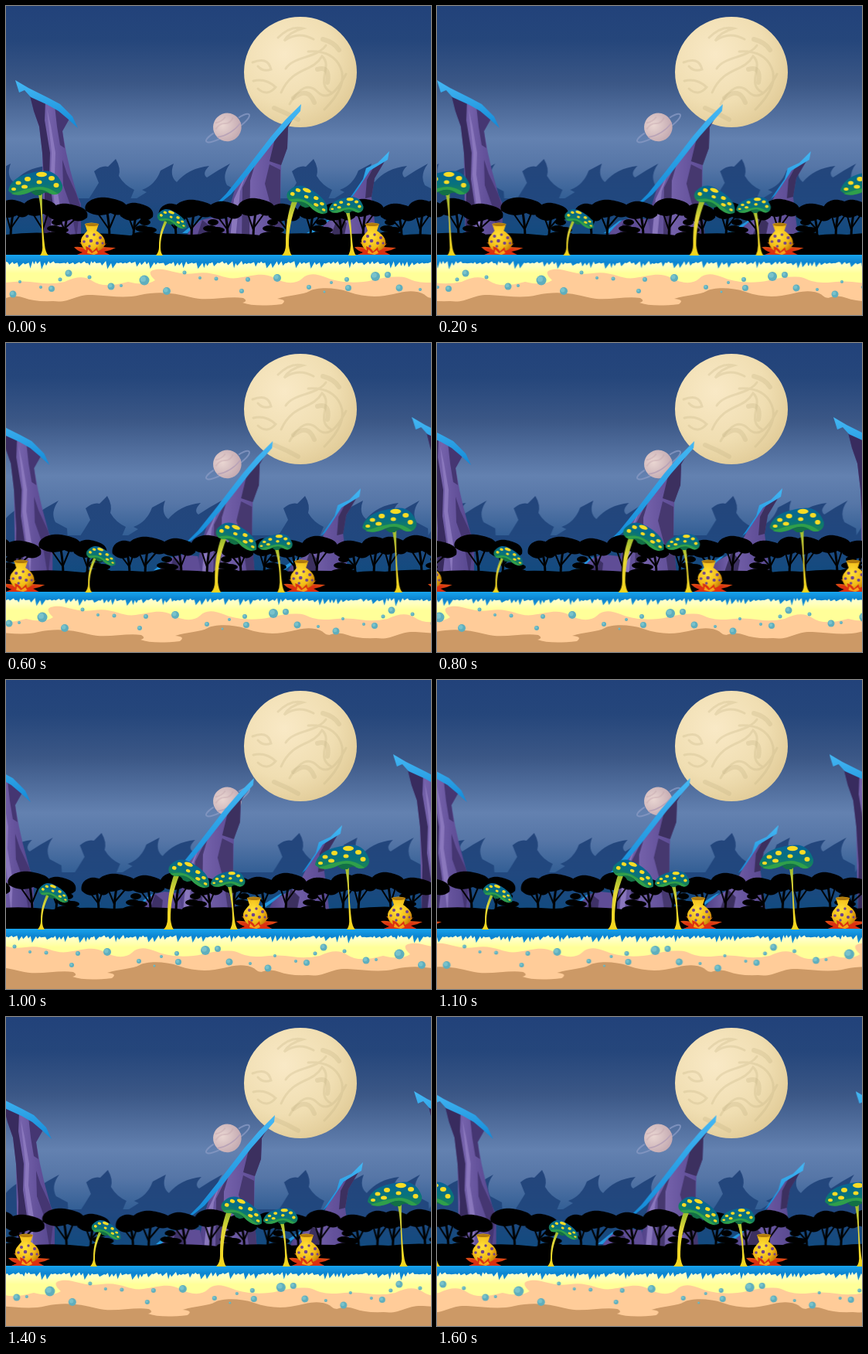
An HTML page that plays this animation: 550x400 px, repeating every 1700 ms.

```html
<!DOCTYPE html>
<html lang="en">
<head>
<meta charset="utf-8">
<title>Alien landscape</title>
<style>
html, body { margin: 0; width: 100%; height: 100%; overflow: hidden; background: #24427a; }
svg { display: block; width: 550px; height: 400px; }
/* Every layer pans left in ten steps, then part of the way back. */
.layer { animation: pan 1700ms infinite; }
@keyframes pan {
  0% { transform: translateX(0); animation-timing-function: steps(10, end); }
  58.8235% { transform: translateX(var(--far)); animation-timing-function: steps(7, end); }
  100% { transform: translateX(calc(var(--far) * .2222)); }
}
</style>
</head>
<body>
<svg viewBox="0 0 550 400" xmlns="http://www.w3.org/2000/svg">
<defs>
  <linearGradient id="sky" x2="0" y2="1">
    <stop offset="0" stop-color="#22427a"/><stop offset=".11" stop-color="#25467b"/>
    <stop offset=".25" stop-color="#3b5786"/><stop offset=".43" stop-color="#6381b0"/>
    <stop offset=".52" stop-color="#5676a7"/><stop offset=".64" stop-color="#2d5b92"/>
    <stop offset=".8" stop-color="#104a80"/>
  </linearGradient>
  <linearGradient id="ridge" gradientUnits="userSpaceOnUse" x1="0" y1="195" x2="0" y2="310">
    <stop offset="0" stop-color="#24457b"/><stop offset=".5" stop-color="#21487f"/><stop offset="1" stop-color="#0e4c80"/>
  </linearGradient>
  <radialGradient id="moon" cx=".36" cy=".34" r=".74">
    <stop offset="0" stop-color="#f9e9c6"/><stop offset=".6" stop-color="#f0deb2"/><stop offset="1" stop-color="#e0ca96"/>
  </radialGradient>
  <radialGradient id="pink" cx=".4" cy=".35" r=".7">
    <stop offset="0" stop-color="#ead6d2"/><stop offset="1" stop-color="#c2a8b0"/>
  </radialGradient>
  <linearGradient id="rock">
    <stop offset="0" stop-color="#4b3c82"/><stop offset=".35" stop-color="#7562ab"/>
    <stop offset=".65" stop-color="#64529b"/><stop offset="1" stop-color="#54458c"/>
  </linearGradient>
  <linearGradient id="ice" x2="0" y2="1">
    <stop offset="0" stop-color="#45b8f4"/><stop offset="1" stop-color="#128ad8"/>
  </linearGradient>
  <linearGradient id="cap" x2="0" y2="1">
    <stop offset="0" stop-color="#07629a"/><stop offset=".55" stop-color="#08727c"/><stop offset="1" stop-color="#1d8a4c"/>
  </linearGradient>
  <linearGradient id="stem" x2="0" y2="1">
    <stop offset="0" stop-color="#8fb82c"/><stop offset=".35" stop-color="#e3d839"/><stop offset="1" stop-color="#f6d51c"/>
  </linearGradient>
  <radialGradient id="clay" cx=".4" cy=".45" r=".62">
    <stop offset="0" stop-color="#ffe23c"/><stop offset=".65" stop-color="#f3bd18"/><stop offset="1" stop-color="#c98408"/>
  </radialGradient>
  <linearGradient id="fire" x2="0" y2="1">
    <stop offset="0" stop-color="#f2701a"/><stop offset="1" stop-color="#c8180c"/>
  </linearGradient>
  <linearGradient id="water" gradientUnits="userSpaceOnUse" x1="0" y1="322" x2="0" y2="340">
    <stop offset="0" stop-color="#18a4ee"/><stop offset=".55" stop-color="#0c84d0"/><stop offset="1" stop-color="#1693d8"/>
  </linearGradient>
  <linearGradient id="sand" gradientUnits="userSpaceOnUse" x1="0" y1="328" x2="0" y2="346">
    <stop offset="0" stop-color="#ffffe0"/><stop offset=".5" stop-color="#ffffc0"/><stop offset="1" stop-color="#ffff99"/>
  </linearGradient>

  <g id="hump"><path d="M103 256L112 242L120 229L114 214Q124 206 132 208L142 198Q149 210 146 220Q153 232 166 238L161 250L168 256Z"/></g>
  <g id="spikes"><path d="M158 256L182 241L176 238Q193 232 200 213L217 204Q211 220 221 228Q236 210 263 207Q253 217 260 222Q275 212 290 204Q279 219 286 232L301 240L302 256Z"/></g>

  <g id="shroom">
    <path fill="url(#cap)" d="M-38-3C-35-18-20-25 3-28C20-31 28-22 32-10C33-2 27 3 19 2C8-2 0-6-8-2C-18 4-33 4-38-3Z"/>
    <path fill="#2f9f4b" d="M-34 1C-22-2-12-7 3-8C14-8 23-1 26 1C22 3 18 2 14 0C8-4 0-5-8-2C-18 3-28 4-34 1Z"/>
    <path fill="#127046" d="M-9-1Q3-8 15 0Q8-2 4 3L-3 3Z"/>
    <g fill="#f8dc25">
      <ellipse cx="5" cy="-24" rx="7" ry="3.200"/><ellipse cx="-13" cy="-18" rx="4" ry="3"/>
      <ellipse cx="18" cy="-19" rx="4" ry="3"/><ellipse cx="2" cy="-14" rx="3.500" ry="2.500"/>
      <ellipse cx="-25" cy="-13" rx="3.500" ry="2.500"/><ellipse cx="-31" cy="-5" rx="3" ry="2"/>
      <ellipse cx="-17" cy="-8" rx="4" ry="2.500"/><ellipse cx="24" cy="-10" rx="3.500" ry="3"/>
    </g>
  </g>

  <g id="pot">
    <path fill="url(#fire)" d="M-25 312Q-14 311-8 315L-18 306Q-4 308 2 315L17 307L13 312L29 313Q22 317 14 318L21 322H-21L-14 319Q-21 317-25 312Z"/>
    <path fill="url(#clay)" d="M-11 282Q-3 279 7 282L4 291C10 295 17 301 15 309Q10 319-1 319C-10 319-17 311-16 303C-15 298-11 295-8 291Z"/>
    <ellipse cx="-2" cy="283" rx="8.500" ry="2" fill="#b07a0d"/>
    <g fill="#70428c">
      <circle cx="-8" cy="298" r="2"/><circle cx="1" cy="296" r="1.700"/><circle cx="9" cy="300" r="2"/>
      <circle cx="-12" cy="305" r="1.800"/><circle cx="-3" cy="304" r="2.300"/><circle cx="5" cy="307" r="2"/>
      <circle cx="-5" cy="311" r="1.700"/><circle cx="12" cy="307" r="1.500"/>
    </g>
    <path fill="#dc3010" d="M-20 314Q-13 314-9 317L-10 311Q-3 313-1 318L5 312L6 317L18 313L13 318L21 322H-21L-13 319Z"/>
    <path fill="#f9a21b" d="M-8 320L-7 315L-2 320L4 316L6 320L1 322Z"/>
  </g>
</defs>

<rect width="550" height="400" fill="url(#sky)"/>

<ellipse cx="381" cy="85.500" rx="73" ry="71.500" fill="url(#moon)"/>
<g fill="none" stroke="#c2b285" stroke-opacity=".3" stroke-width="3" stroke-linecap="round">
  <path d="M352 41Q368 25 384 29Q366 34 360 45Q378 32 398 43M319 73Q339 65 343 82Q333 86 326 78M320 97Q336 93 349 105Q338 118 326 107"/>
  <path d="M362 81C372 65 402 68 414 51M356 112C371 78 396 87 409 65C424 78 399 100 421 112M367 127Q386 94 403 111T440 88M391 59Q423 57 433 80T412 134"/>
  <path stroke-width="6" d="M372 119Q391 104 399 125M403 82Q420 77 416 99M347 132Q364 139 378 147M410 43Q425 47 431 57"/>
</g>

<g transform="rotate(-32 287 158)">
  <path d="M268 154C246 154 249 165 287 165S328 154 306 154" fill="none" stroke="#8799c4" stroke-width="2" opacity=".8"/>
  <circle cx="287" cy="156.700" r="18.300" fill="url(#pink)"/>
  <path d="M269 161Q286 168 305 161" fill="none" stroke="#b9a3b7" stroke-width="1.500"/>
  <path d="M273 151q8-4 14 0t13-1M277 144q8 3 15 0" fill="none" stroke="#c4a4ac" stroke-width="2" opacity=".4"/>
</g>

<g class="layer" style="--far:-18.400px" fill="url(#ridge)">
  <rect y="249" width="600" height="75"/>
  <use href="#spikes" x="-211"/><use href="#hump"/><use href="#spikes"/>
  <use href="#hump" x="256"/><use href="#spikes" x="256"/><use href="#hump" x="450"/>
</g>

<g class="layer" style="--far:-61.200px">
  <g id="cliffs">
    <path fill="url(#rock)" d="M31 116L60 124L82 146L73 162L78 190L83 212L92 245L97 256V302H49L48 256L47 190L43 156L36 136Z"/>
    <path fill="#382b5e" d="M31 116L51 123L50 148L57 190L56 224L61 258L56 302H49L50 240L47 190L43 156L36 136Z"/>
    <path fill="#453672" d="M63 129L82 146L73 162L76 184L70 180L66 156ZM73 199L79 217L91 243L96 258L91 302L84 260L74 232Z"/>
    <path fill="#8a77bd" d="M53 133L58 155L64 190L63 218L70 260L68 302L63 258L58 218L59 190Z"/>
    <path fill="url(#ice)" d="M12 96L29 106L55 119L70 127L86 143L93 158L81 147L68 136L54 128L32 118L24 109L17 112Z"/>

    <path fill="url(#rock)" d="M379 132L365 157L364 184L356 206L355 255L359 302H281L290 258L300 225L340 178Z"/>
    <path fill="#3c305f" d="M380 131L365 157L364 184L356 206L341 201L349 168Z"/>
    <path fill="#46386f" d="M324 199L316 226L315 302H305L306 235ZM341 205L355 212L355 255L359 302H349L343 260L335 230Z"/>
    <path fill="#8a77bd" d="M312 214L303 240L297 302H290L295 250Z"/>
    <path fill="url(#ice)" d="M382 127L381 136L352 169L316 215L291 244L276 256L270 258L285 243L309 213L343 169L361 148Z"/>

    <path fill="#5f4d96" d="M234 298L240 284L253 277L266 274L285 276L290 302H234Z"/>
    <path fill="#3e3167" d="M254 277L264 285L262 302H246Z"/>
    <path fill="#2398e0" d="M228 294L248 278L252 277L241 287L235 294Z"/>

    <path fill="url(#rock)" d="M490 201L477 223L473 247L480 302H398L408 284L438 268L450 244L470 213Z"/>
    <path fill="#3c305f" d="M490 201L477 223L473 247L465 249L467 225L475 210ZM430 270L441 281L437 302H419Z"/>
    <path fill="url(#ice)" d="M496 188L494 199L471 213L456 236L449 246L444 250L462 224L466 210L481 203Z"/>
    <path fill="#2398e0" d="M389 294L416 277L420 276L408 286L397 294Z"/>
  </g>
  <use href="#cliffs" x="550"/>
</g>

<g class="layer" style="--far:-100px">
  <g id="trees" stroke="#000" stroke-linecap="round"></g>
  <use href="#trees" x="550"/>
</g>

<g class="layer" style="--far:-220px">
  <g id="soil">
    <rect y="326" width="551" height="74" fill="url(#sand)"/>
    <path fill="#fc9" d="M0 358Q22 355 40 358T76 357Q98 346 112 356T158 357Q181 363 193 355Q182 345 190 342C209 337 219 350 245 346S281 355 300 352S333 344 347 352S376 360 383 353S399 345 416 352S458 359 474 355S510 348 521 353S540 358 551 358V400H0Z"/>
    <path fill="#c96" d="M0 378Q12 373 24 378T61 382C83 385 89 373 112 374S153 379 174 374S218 371 239 377S286 375 307 378Q314 382 306 384Q322 390 357 386Q365 380 351 379C367 374 384 374 393 369S426 364 443 370S476 377 490 375S518 367 532 370S541 377 551 378V400H0Z"/>
    <g id="bubbles"></g>
  </g>
  <use href="#soil" x="550"/>
</g>

<g class="layer" style="--far:-153px">
  <g id="front">
    <path id="drips" fill="url(#water)"/>
    <g fill="url(#stem)">
      <path d="M41 239H47C46 266 48 291 50 309Q51 319 55 323H44Q48 318 47 309C46 280 46 262 41 239Z"/>
      <path d="M371 250L378 251C368 275 366 293 366 310Q367 319 370 323H357Q362 318 362 309C362 285 364 270 371 250Z"/>
      <path d="M438 262H444C447 281 447 296 449 311Q450 319 453 323H443Q446 317 446 310C446 293 444 278 438 262Z"/>
      <path d="M206 276L210 277C202 291 200 302 200 313Q200 319 203 323H194Q198 318 198 312C198 296 201 288 206 276Z"/>
    </g>
    <use href="#shroom" transform="translate(41 242)"/>
    <use href="#shroom" transform="translate(386 258) rotate(22) scale(-.82 .8)"/>
    <use href="#shroom" transform="translate(442 266) scale(.64 .66)"/>
    <use href="#shroom" transform="translate(212 281) rotate(20) scale(-.58 .57)"/>
    <use href="#pot" x="113"/><use href="#pot" x="476"/>
  </g>
  <use href="#front" x="550"/>
</g>
</svg>
<script>
const $ = id => document.getElementById(id);
let seed = 7;
const rand = () => (seed = seed * 16807 % 2147483647) / 2147483647;

// Umbrella trees: x, y, half width
const trees = [
  [10, 262, 20], [44, 260, 22], [80, 267, 25], [130, 259, 27], [169, 266, 21], [216, 267, 18], [244, 262, 26],
  [283, 264, 22], [324, 260, 24], [360, 267, 20], [398, 264, 20], [430, 266, 22], [466, 261, 23], [508, 267, 23], [540, 262, 20]
];
const crown = ([x, y, r]) =>
  `<path stroke="none" d="M${x - r} ${y + 6}C${x - r * 1.15} ${y - 6} ${x - r * .5} ${y - 13} ${x} ${y - 11}` +
  `S${x + r * 1.15} ${y - 5} ${x + r} ${y + 7}Q${x + r * .6} ${y + 15} ${x + r * .2} ${y + 9}` +
  `Q${x - r * .4} ${y + 16} ${x - r} ${y + 6}"/>`;
const trunk = ([x, y, r], i) => {
  const foot = x + (i % 2 ? 4 : -4);
  return `<path fill="none" stroke-width="3" d="M${x} ${y + 3}Q${foot} 282 ${foot} 302"/>` +
    `<path fill="none" stroke-width="2" d="M${x - r * .5} ${y + 6}L${foot} 290M${x + r * .5} ${y + 6}L${foot} 288"/>`;
};
// Layered shrubs that stand between the trees
const shrub = x => [[0, 280, 7, 4], [-4, 288, 9, 4], [5, 290, 10, 4], [0, 297, 17, 5]]
  .map(([dx, y, rx, ry]) => `<ellipse stroke="none" cx="${x + dx}" cy="${y}" rx="${rx}" ry="${ry}"/>`).join("");
$("trees").innerHTML = trees.map(crown).join("") + trees.map(trunk).join("") +
  [66, 180, 268, 345, 408, 497].map(shrub).join("") +
  '<path stroke="none" d="M0 296Q40 291 80 296Q120 292 160 297Q200 293 240 296Q290 292 330 297Q380 292 420 296Q470 293 510 297Q530 294 551 296V324H0Z"/>';

// Bubbles: x, y, radius
$("bubbles").innerHTML = [
  [9, 373, 4.5], [18, 357, 2], [45, 364, 2], [59, 366, 4], [70, 354, 2.5], [81, 346, 4.5], [108, 351, 2.5],
  [136, 363, 4.5], [149, 362, 2], [179, 355, 6.5], [208, 369, 5], [231, 345, 2.5], [251, 352, 2], [272, 353, 2.5],
  [305, 369, 3], [313, 354, 3], [351, 352, 5], [392, 364, 3], [412, 370, 1.5], [421, 358, 2], [441, 354, 3],
  [443, 365, 4], [478, 350, 6], [494, 348, 4], [509, 365, 4.5], [536, 367, 2]
].map(([x, y, r]) => `<circle cx="${x}" cy="${y}" r="${r}" fill="#5faebd"/>` +
  `<circle cx="${x - r * .25}" cy="${y - r * .25}" r="${r * .55}" fill="#78c2cb"/>`).join("");

let edge = "M0 322H551V331";
for (let x = 546; x > 4; x -= 4 + rand() * 4) {
  const tip = 333 + rand() ** 2 * 8;
  edge += `L${x.toFixed(1)} ${tip.toFixed(1)}L${(x - 2).toFixed(1)} ${(330 + rand() * 3).toFixed(1)}`;
}
$("drips").setAttribute("d", edge + "L0 331Z");
</script>
</body>
</html>
```
